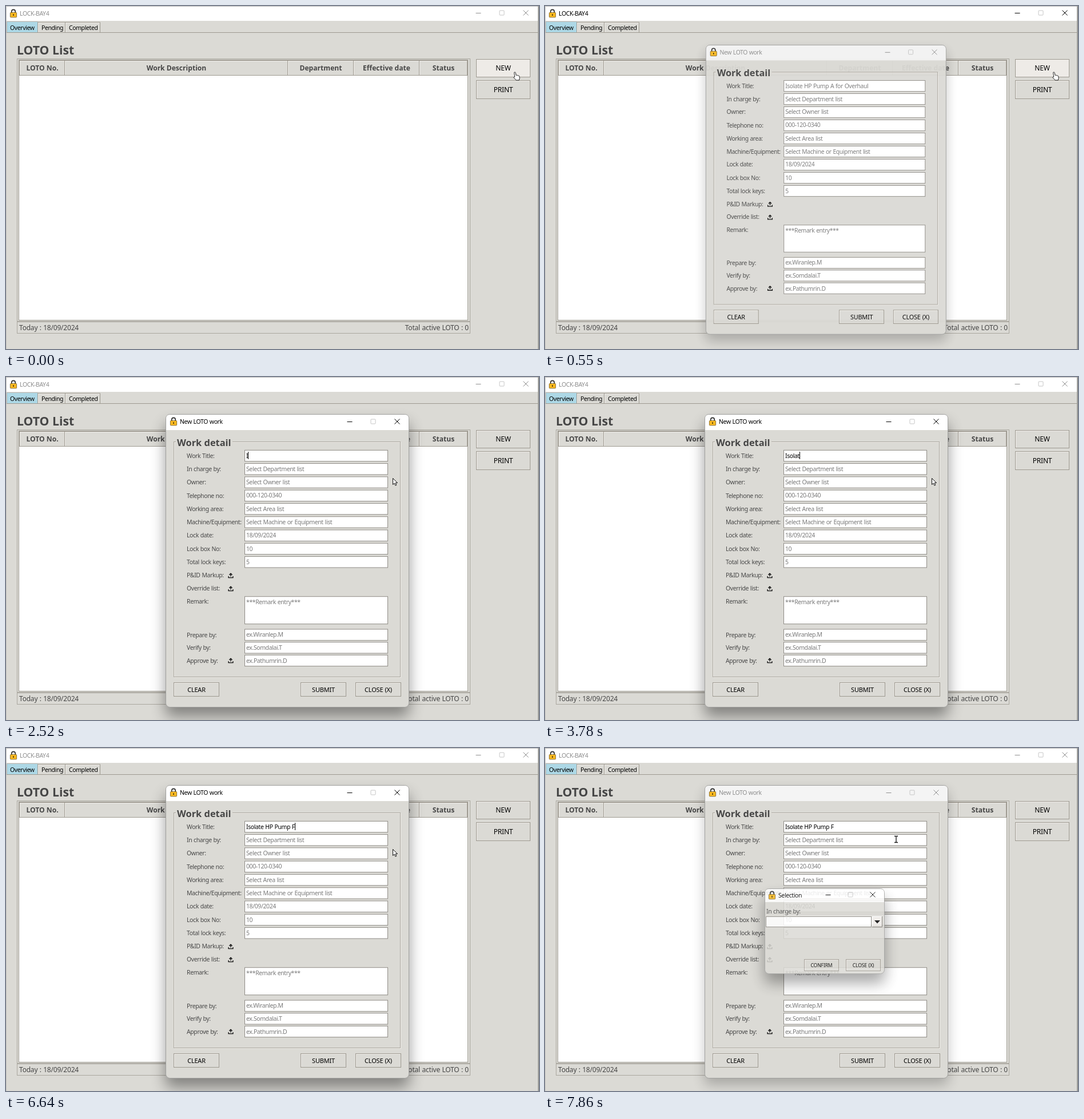
Animation of 932 by 601 pixels, one loop 8 s. Source, as an HTML page:

```html
<!DOCTYPE html>
<html lang="en">
<head>
<meta charset="utf-8">
<title>Lock list</title>
<style>
  html, body { margin: 0; width: 100%; height: 100%; overflow: hidden; background: #dbdad5; }
  svg { display: block; width: 932px; height: 601px; }
  text {
    font: 10.5px "Noto Sans", "Open Sans", sans-serif;
    letter-spacing: -.4px; word-spacing: .5px; white-space: pre; fill: #000;
  }
  .label { fill: #484848; }
  .hint { fill: #7a7a7a; }
  .mid { text-anchor: middle; }
  .foot { font-size: 12px; letter-spacing: -.2px; fill: #464646; }
  .btn { font-size: 12px; letter-spacing: -.2px; }
  .btn.small { font-size: 11px; }
  .btn.tiny { font-size: 8.7px; }
  .bold { font-weight: 700; letter-spacing: 0; word-spacing: 0; fill: #464646; }
  .h1 { font-size: 21.2px; }
  .h2 { font-size: 16.4px; }
  .th { font-size: 12.1px; }
  .win { color: #8e8e8e; }
  .win.on { color: #000; }
  .cap { fill: currentColor; }
  .shadow { opacity: .23; filter: blur(11px); transform: translateY(11px); }
  .on > .shadow { opacity: .4; filter: blur(13px); transform: translateY(16px); }
  #dialog { transform-origin: 436px 310px; }
  #dialog .bar { fill: #f4f4f4; }
  #dialog.on .bar { fill: #fff; }
</style>
</head>
<body>
<svg id="stage" viewBox="0 0 932 601" xmlns="http://www.w3.org/2000/svg"></svg>
<script>
const BG = '#dbdad5', EDGE = '#9e9a91', LIGHT = '#eeebe7';

const rect = (x, y, w, h, fill, stroke, more = '') =>
  `<rect x="${x}" y="${y}" width="${w}" height="${h}" fill="${fill}" ${stroke ? `stroke="${stroke}"` : ''} ${more}/>`;
const text = (x, y, s, cls = '', more = '') =>
  `<text x="${x}" y="${y}" class="${cls}" ${more}>${s.replace('&', '&amp;')}</text>`;
const path = (d, stroke, fill = 'none', more = '') =>
  `<path d="${d}" fill="${fill}" stroke="${stroke}" ${more}/>`;
const place = (x, y, body) => `<g transform="translate(${x} ${y})">${body}</g>`;

const lock = (x, y) => place(x, y,
  path('M2.8 7V4.6a3.2 3.2 0 0 1 6.4 0V7', '#2b2b2b', 'none', 'stroke-width="1.6"') +
  rect(.4, 6.4, 11.2, 8.4, '#fdbb22', '#5a430c', 'rx="1" stroke-width=".7"') +
  path('M6 9.2v2.8', '#2b2002', 'none', 'stroke-width="1.5"'));

const controls = (min, max, close, y) =>
  path(`M${min - 4.5} ${y}.5h9`, 'currentColor') +
  rect(max - 4, y - 4, 8, 8, 'none', '#c6c6c6', 'rx="1"') +
  path(`M${close - 4.5} ${y - 4.5}l9 9m0 -9l-9 9`, 'currentColor');

const button = (x, y, w, h, label, size = '', id = '') =>
  rect(x + .5, y + .5, w - 1, h - 1, BG, EDGE, id && `id="${id}"`) +
  path(`M${x + 1.5} ${y + h - 2}V${y + 1.5}H${x + w - 2}`, LIGHT) +
  text(x + w / 2, y + h / 2 + (size === 'tiny' ? 3.2 : 4.2), label, `btn mid ${size}`);

const upload = (x, y) => place(x, y,
  path('M0 1.5V-3M-2.6 -1.2L0 -3.8L2.6 -1.2M-3.9 1v2.6h7.8V1', '#111', 'none', 'stroke-width="1.4"'));

const frame = (x, y, w, h) =>
  rect(x, y, w, h, '#000', '', 'rx="7" class="shadow"') +
  rect(x + .5, y + .5, w - 1, h - 1, BG, '#a0a09e', 'rx="7"');
const titleBar = (x, y, w, h) =>
  path(`M${x + 1} ${y + h}V${y + 8}q0-7 7-7h${w - 16}q7 0 7 7v${h - 8}z`, 'none', '#fff', 'class="bar"');

function mainWindow() {
  const cols = [[24, 103, 'LOTO No.'], [103, 493, 'Work Description'], [493, 608, 'Department'],
                [608, 723, 'Effective date'], [723, 807, 'Status']];
  return rect(0, 0, 932, 601, BG) + rect(0, 0, 931, 26, '#fff') +
    path('M0 .5H931', '#b9b9b9') + path('M931 0V601', '#9b9b98', 'none', 'stroke-width="2"') +
    path('M.5 0V601', '#c4c3bf') +
    lock(7, 5) + text(24, 17, 'LOCK-BAY4', 'cap') + controls(826, 867, 909, 12) +
    path('M1 46.5H930', EDGE) +
    rect(1, 27, 54, 19, '#add8e6') + path('M1.5 46V27.5H55.5V46', '#b5b9b8') +
    path('M55.5 46V28.5H164.5V46M103.5 28V46', EDGE) +
    path('M56.5 46V29.5H103M104.5 46V29.5H164', LIGHT) +
    text(7, 42, 'Overview') + text(62, 42, 'Pending') + text(110, 42, 'Completed') +
    text(19, 85, 'LOTO List', 'bold h1') +
    rect(19.5, 92.5, 792, 460, BG, '#aaa79f') + rect(22.5, 94.5, 785, 456, '#fff', EDGE) +
    cols.map(([a, b, s]) => rect(a - .5, 95.5, b - a, 26, BG, EDGE) +
      path(`M${a + .5} 121V96.5H${b - 1}`, LIGHT) +
      text((a + b) / 2, 113, s, 'bold th mid')).join('') +
    rect(19.5, 553.5, 792, 20, BG, '#aaa79f') +
    text(23, 568, 'Today : 18/09/2024', 'foot') +
    text(809, 568, 'Total active LOTO : 0', 'foot', 'text-anchor="end"') +
    button(822, 93, 95, 32, 'NEW', '', 'new') + button(822, 130, 95, 33, 'PRINT');
}

function dialog() {
  const rows = [['Work Title:', ''], ['In charge by:', 'Select Department list'],
    ['Owner:', 'Select Owner list'], ['Telephone no:', '000-120-0340'],
    ['Working area:', 'Select Area list'], ['Machine/Equipment:', 'Select Machine or Equipment list'],
    ['Lock date:', '18/09/2024'], ['Lock box No:', '10'], ['Total lock keys:', '5']];
  const signers = [['Prepare by:', 'ex.Wiranlep.M'], ['Verify by:', 'ex.Somdalai.T'], ['Approve by:', 'ex.Pathumrin.D']];
  const label = (y, s) => text(316, Math.round(y + 3.8), s, 'label');
  const entry = (y, s, h = 19.4) =>
    rect(417.5, y - 9.7, 250, h, '#fff', '#8f8c86') + text(420, Math.round(y + 3.6), s, 'hint');
  const row = (y, [name, hint]) => label(y, name) + entry(y, hint);
  return frame(279, 65, 426, 514) + titleBar(279, 65, 426, 28) +
    lock(287, 70) + text(304, 82, 'New LOTO work', 'cap') + controls(601, 642, 684, 78) +
    rect(294.5, 114.5, 396, 412, 'none', LIGHT) + rect(293.5, 113.5, 396, 412, 'none', '#aaa79f') +
    rect(297, 106, 99, 18, BG) + text(299, 121, 'Work detail', 'bold h2') +
    rows.map((r, i) => row(138 + 23.28 * i, r)).join('') +
    text(420, 141.5, '', '', 'id="entry"') + rect(420, 131, 1, 13, '#000', '', 'id="caret"') +
    label(347, 'P&ID Markup:') + upload(393, 348) +
    label(370, 'Override list:') + upload(393, 371) +
    label(393, 'Remark:') + entry(394.4, '***Remark entry***', 48) +
    signers.map((r, i) => row(451.7 + 22.6 * i, r)).join('') + upload(393, 497) +
    button(293, 535, 80, 25, 'CLEAR', 'small') + button(515, 535, 80, 25, 'SUBMIT', 'small') +
    button(611, 535, 80, 25, 'CLOSE (X)', 'small');
}

function popup() {
  return frame(384, 246, 210, 150) + titleBar(384, 246, 210, 24) +
    lock(391, 250) + text(408, 262, 'Selection', 'cap') + controls(495, 534, 573, 257) +
    text(387, 290, 'In charge by:', 'label') +
    rect(386.5, 295.5, 184, 18, '#fff', '#8f8c86') + rect(572.5, 295.5, 17, 18, LIGHT, '#fff') +
    path('M589.5 295V313.5H572', '#77746e') +
    path('M576 302h10l-5 5.5z', 'none', '#000') +
    button(453, 370, 61, 21, 'CONFIRM', 'tiny') + button(526, 370, 61, 21, 'CLOSE (X)', 'tiny');
}

const cursors = {
  hand: path('M-3.4 -6.6q1.4-1.4 2.4.3l1.1 4.8q1.3-.9 2 .2q1.4-.7 2 .5q1.4-.3 1.6 1.2l.4 3.2l-.9 3.4h-5l-4.4-4.6q-.2-1.8 1.8-1.1z',
    '#111', '#fff', 'stroke-width=".9"'),
  arrow: path('M0 0V11L2.7 8.6L4.4 12.6L6.3 11.8L4.6 7.9H8z', '#111', '#fff'),
  beam: path('M-3 -5.5H-1L0 -4.8L1 -5.5H3M0 -5V5M-3 5.5H-1L0 4.8L1 5.5H3', '#111', 'none', 'stroke-width="1.3"')
};

const $ = id => document.getElementById(id);
$('stage').innerHTML =
  `<g id="main" class="win">${mainWindow()}</g><g id="dialog" class="win">${dialog()}</g>` +
  `<g id="popup" class="win on" opacity=".85">${popup()}</g><g id="cursor"></g>`;

const LOOP = 8000, HINT = 'Isolate HP Pump A for Overhaul', TYPED = 'Isolate HP Pump F';

// [time, letters typed (-1: hint), caret shown]
const typing = [[0, -1, 0], [1820, 0, 1], [2520, 1, 1], [2800, 2, 1], [2950, 3, 1],
  [3230, 4, 1], [3500, 5, 1], [3780, 6, 1], [3900, 7, 1], [4170, 8, 0], [4570, 9, 1],
  [4820, 10, 1], [5100, 11, 0], [5410, 12, 1], [5680, 13, 1], [5960, 14, 1],
  [6090, 15, 0], [6370, 16, 1], [6640, 17, 1], [7200, 17, 0], [7740, 17, 1], [7860, 17, 0]];
// [time, shape, x, y]
const pointer = [[0, 'hand', 892, 123], [950, 'arrow', 812, 134], [1090, 'arrow', 690, 140],
  [1240, 'beam', 570, 140], [1380, 'beam', 522, 138], [1820, 'arrow', 676.5, 177.5],
  [7050, 'arrow', 671, 184], [7200, 'arrow', 669, 182], [7340, 'beam', 645, 165],
  [7480, 'beam', 624, 161], [7620, 'beam', 614, 160]];
// [time, scale, opacity]
const opening = [[0, 1, 0], [400, .942, .78], [550, .988, .95], [670, 1, 1]];
// [time, active window]
const focus = [[0, ''], [280, 'main'], [1530, 'dialog'], [7860, 'popup']];

const at = (steps, t) => steps.filter(s => s[0] <= t).pop();

function render(t) {
  const [, count, caret] = at(typing, t);
  const entry = $('entry');
  const value = count < 0 ? HINT : TYPED.slice(0, count);
  if (entry.textContent !== value) entry.textContent = value;
  entry.setAttribute('class', count < 0 ? 'hint' : '');
  $('caret').setAttribute('x', Math.round(420 + (count > 0 ? entry.getComputedTextLength() : 0)));
  $('caret').setAttribute('opacity', caret);

  const [, scale, opacity] = at(opening, t);
  $('dialog').style.transform = scale === 1 ? 'none' : `scale(${scale})`;
  $('dialog').style.opacity = opacity;

  const active = at(focus, t)[1];
  for (const id of ['main', 'dialog']) $(id).classList.toggle('on', id === active);
  $('popup').style.display = active === 'popup' ? '' : 'none';
  $('new').setAttribute('fill', t < 950 ? LIGHT : BG);

  const [, shape, x, y] = at(pointer, t);
  const cursor = $('cursor');
  if (cursor.dataset.shape !== shape) {
    cursor.innerHTML = cursors[shape];
    cursor.dataset.shape = shape;
  }
  cursor.setAttribute('transform', `translate(${x} ${y})`);
}

const start = performance.now();
function tick() {
  render((performance.now() - start) % LOOP);
  requestAnimationFrame(tick);
}
tick();
</script>
</body>
</html>
```
